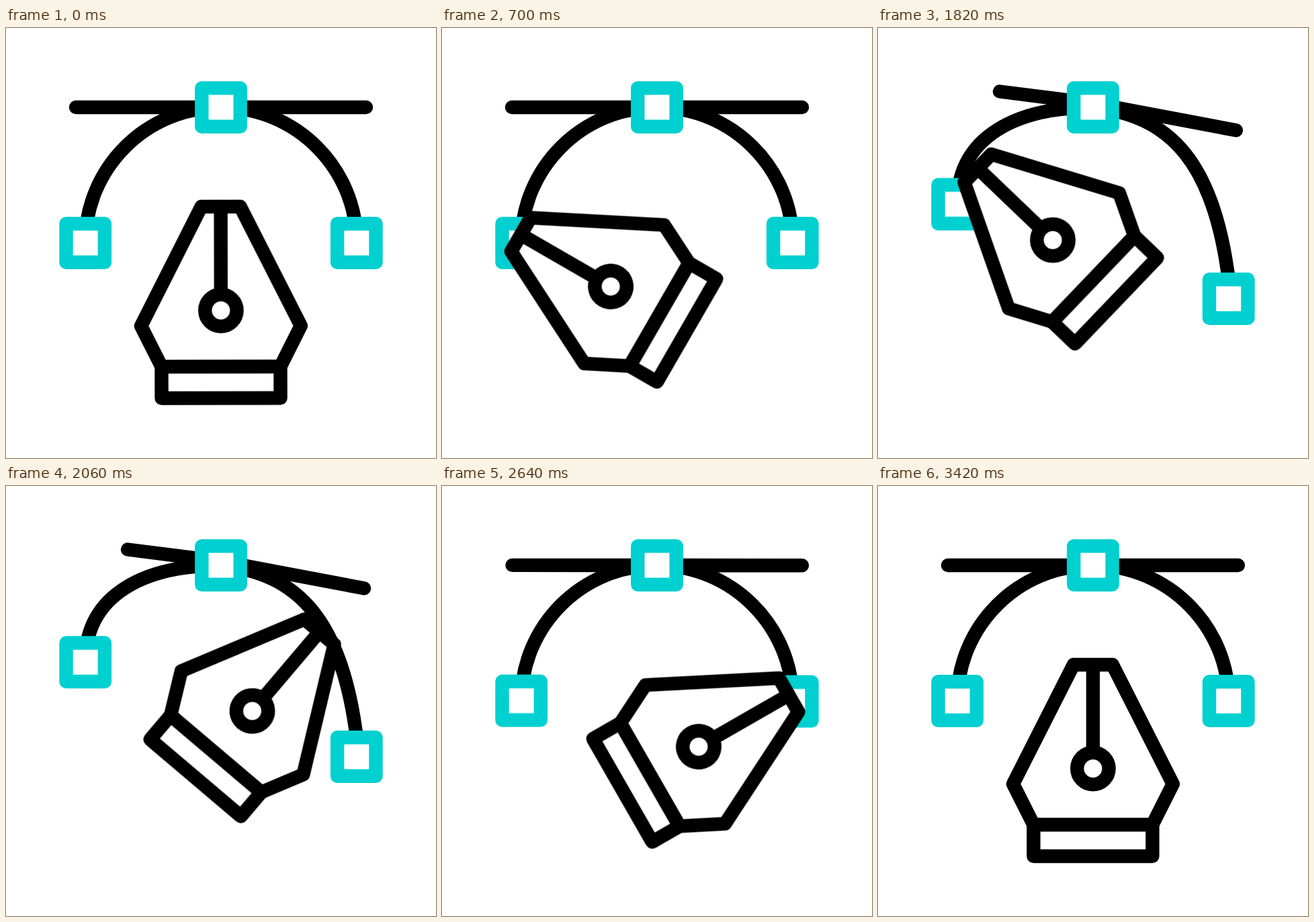
An HTML page without scripts that plays this animation: 640 px wide and 640 px high, repeating every 3600 ms.

```html
<!DOCTYPE html>
<html lang="en">
<head>
<meta charset="utf-8">
<title>Pen tool</title>
<style>
  html, body { margin: 0; width: 100%; height: 100%; overflow: hidden; background: #fff; }
  svg { display: block; width: 100%; height: 100%; }
  g, path, rect { animation: 3600ms linear infinite; }
  .ink { fill: none; stroke: #000; stroke-width: 20.4; stroke-linecap: round; stroke-linejoin: round; }
  .ink .solid { fill: #fff; }
  .node { fill: #fff; stroke: #00d0d0; stroke-width: 20.4; stroke-linejoin: round; }

  .curve { animation-name: bend; }
  .left { --dy: -57.7px; animation-name: slide; }
  .right { --dy: 83px; animation-name: slide; }
  .pen { transform-origin: 0 0; animation-name: pen; }

  @keyframes bend {
    0%, 73.889%, 100% {
      d: path("M104 118L320 118L536 118M118 320C118 208.5 208.5 118 320 118C431.5 118 522 208.5 522 320");
    }
    25% {
      d: path("M104 118L320 118L536 118M118 320C118 208.5 208.5 118 320 118C431.5 118 522 208.5 522 320");
      animation-timing-function: cubic-bezier(.167, .167, .667, 1);
    }
    40.556%, 63.472% {
      d: path("M181 94.5L320 112L533 152.3M118 262.3C118 160 208.5 118 320 118C431.5 130 506 195 525 403");
      animation-timing-function: cubic-bezier(.333, .11, .667, 1);
    }
  }

  @keyframes slide {
    0%, 73.889%, 100% { transform: translateY(0); }
    25% { transform: translateY(0); animation-timing-function: cubic-bezier(.167, .167, .667, 1); }
    40.556%, 63.472% {
      transform: translateY(var(--dy));
      animation-timing-function: cubic-bezier(.333, .11, .667, 1);
    }
  }

  /* The pen turns about the middle of its base */
  @keyframes pen {
    0% {
      transform: translate(320px, 551px) rotate(0deg);
      animation-timing-function: cubic-bezier(.167, .167, .667, 1);
    }
    19.444%, 25% {
      transform: translate(364.2px, 450px) rotate(-60deg);
      animation-timing-function: cubic-bezier(.167, .167, .667, 1);
    }
    40.556% { transform: translate(365.9px, 401.4px) rotate(-60deg); }
    49.444% {
      transform: translate(365.9px, 401.4px) rotate(-60deg);
      animation-timing-function: cubic-bezier(.181, .144, .58, .633);
    }
    57.222% {
      transform: translate(282.4px, 434.3px) rotate(40deg);
      animation-timing-function: cubic-bezier(.345, .562, .702, 1);
    }
    63.472% {
      transform: translate(243px, 447.2px) rotate(82deg);
      animation-timing-function: cubic-bezier(.333, .11, .667, 1);
    }
    73.889% { transform: translate(269px, 453px) rotate(60deg); }
    79.306% {
      transform: translate(269px, 453px) rotate(60deg);
      animation-timing-function: cubic-bezier(.167, .167, .667, 1);
    }
    95%, 100% { transform: translate(320px, 551px) rotate(0deg); }
  }
</style>
</head>
<body>
<svg viewBox="0 0 640 640">
  <g class="ink">
    <path class="curve" d="M104 118L320 118L536 118M118 320C118 208.5 208.5 118 320 118C431.5 118 522 208.5 522 320"/>
  </g>
  <g class="node">
    <rect x="291.3" y="89.4" width="57.4" height="57.4"/>
    <rect class="left" x="89.5" y="291.3" width="57.4" height="57.4"/>
    <rect class="right" x="493.1" y="291.3" width="57.4" height="57.4"/>
  </g>
  <g class="ink pen" transform="translate(320 551)">
    <rect class="solid" x="-88.5" y="-47" width="177" height="47"/>
    <path class="solid" d="M-29 -285H29L119 -107.5L88.5 -47H-88.5L-119 -107.5Z"/>
    <path d="M0 -285V-154"/>
    <circle class="solid" cy="-130.5" r="23.7"/>
  </g>
</svg>
</body>
</html>
```
